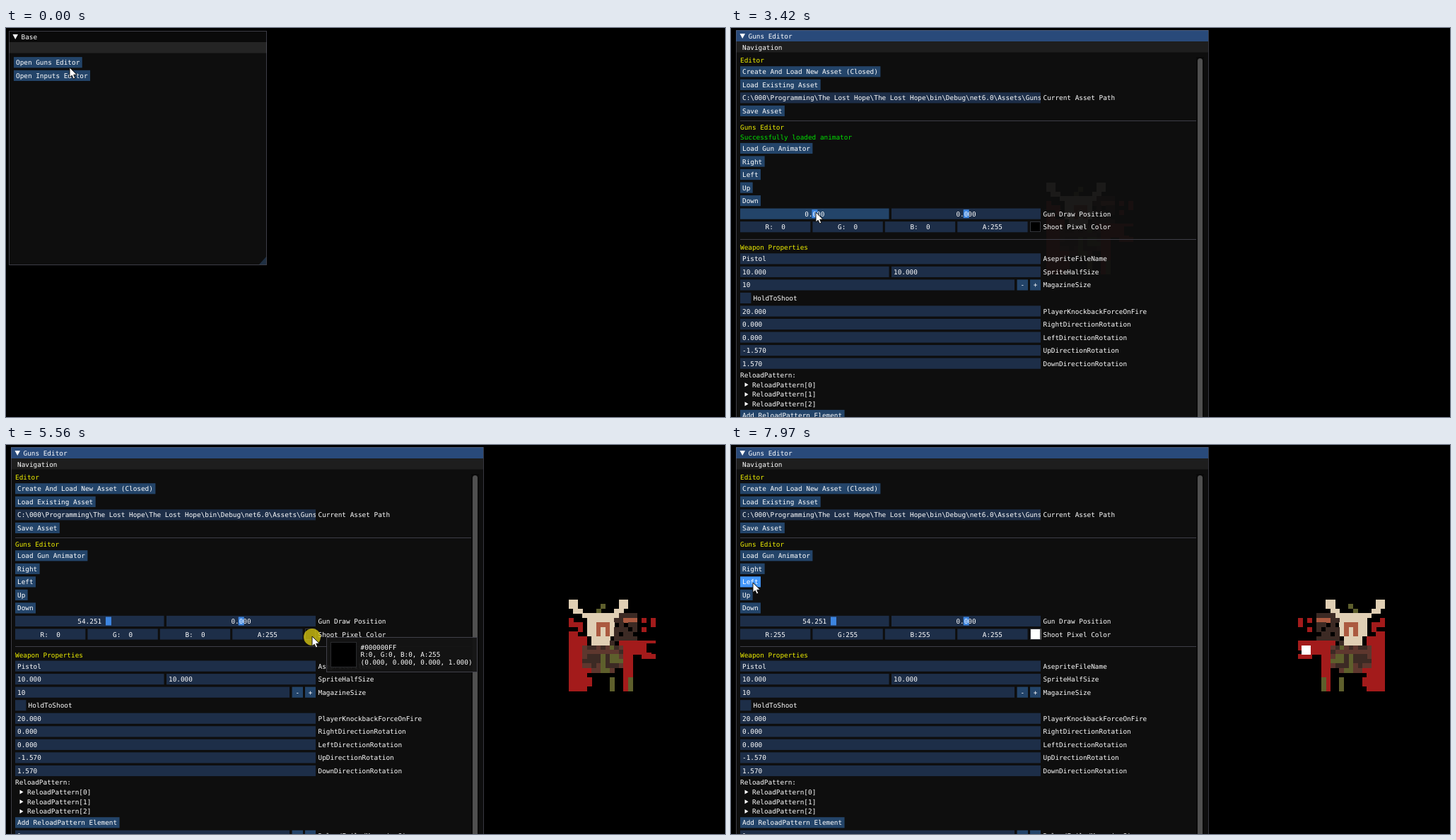
These frames come from a looping animation (1017x551 px, 8 s). An HTML page with a canvas:

```html
<!DOCTYPE html>
<html lang="en">
<head>
<meta charset="utf-8">
<title>Guns Editor</title>
<style>
html, body { margin: 0; width: 100%; height: 100%; overflow: hidden; background: #000; }
canvas { display: block; width: 1017px; height: 551px; }
</style>
</head>
<body>
<canvas id="stage" width="1017" height="551"></canvas>
<script>
const ctx = document.getElementById('stage').getContext('2d');
const LOOP = 8000, TICK = 67, CHAR = 5.647, CELL = 6.45;
const FRAME = '#1d2e48', BUTTON = '#234469', HOVER = '#4296fa', PRESS = '#0f87fa';
const FRAME_ACTIVE = '#3169ac', GRAB = '#3d85e0', GRAB_ACTIVE = '#5a9ee8';
const LINE = 'rgba(110,110,128,.5)', YELLOW = '#f0f000';
const clamp = (v, lo, hi) => Math.max(lo, Math.min(hi, v));

// Moments of the session, in ticks
const OPEN = 7, LOAD = 36, DRAG = 52, DROP = 68, TIP = 80, POPUP = 85, PICK = 90, PICKED = 93, CLOSE = 99, FLIP = 119;
const isDown = n => [[OPEN - 2, OPEN], [LOAD - 2, LOAD], [DRAG, DROP], [POPUP - 2, POPUP],
  [PICK, PICKED + 1], [CLOSE, CLOSE + 1], [FLIP - 2, FLIP]].some(([a, b]) => n >= a && n < b);

// The pointer glides to each stop: from tick, to tick, x, y
const SLIDE_X = 120, SLIDE = .489;
const slideTo = v => SLIDE_X + v * SLIDE;
const moves = [
  [0, 4, 98, 49], [13, 16, 56, 91], [16, 25, 69, 158], [39, 51, SLIDE_X, 262],
  [54, 58, slideTo(28.34), 262], [58, 59, slideTo(47.8), 262], [62, 63, slideTo(54.251), 262],
  [67, 76, 454, 291], [76, 79, 433, 272],
  [85, 89, 452, 345], [89, PICKED, 405, 265], [PICKED, 97, 351, 181], [100, 107, 32, 181], [107, 114, 31, 196]
];

function pointer(n) {
  let x = 90, y = 57;
  for (const [from, to, tx, ty] of moves) {
    const t = clamp((n - from) / (to - from), 0, 1), k = t * (2 - t);
    x += (tx - x) * k;
    y += (ty - y) * k;
  }
  return { x, y };
}
const gunX = n => (pointer(clamp(n, DRAG, DROP - 1)).x - SLIDE_X) / SLIDE;

function picked(n) {
  if (n < PICK) return { s: 0, v: 0 };
  const p = pointer(Math.min(n, PICKED));
  return { s: clamp((p.x - 429.5) / 165.5, 0, 1), v: 1 - clamp((p.y - 302) / 166, 0, 1) };
}
function rgbOf({ s, v }) {
  const lo = Math.round(255 * v * (1 - s));
  return [Math.round(255 * v), lo, lo];
}

// Drawing helpers
function rect(x0, y0, x1, y1, fill) {
  ctx.fillStyle = fill;
  ctx.fillRect(x0, y0, x1 - x0, y1 - y0);
}
function outline(x0, y0, x1, y1, color = LINE) {
  ctx.strokeStyle = color;
  ctx.lineWidth = 1;
  ctx.strokeRect(x0 + .5, y0 + .5, x1 - x0 - 1, y1 - y0 - 1);
}
function panel(x0, y0, x1, y1, fill, edge) {
  rect(x0, y0, x1, y1, fill);
  outline(x0, y0, x1, y1, edge);
}
function poly(fill, ...pts) {
  ctx.beginPath();
  pts.forEach(([x, y]) => ctx.lineTo(x, y));
  ctx.closePath();
  ctx.fillStyle = fill;
  ctx.fill();
}
function disc(x, y, r, fill) {
  ctx.beginPath();
  ctx.arc(x, y, r, 0, Math.PI * 2);
  ctx.fillStyle = fill;
  ctx.fill();
}
function text(s, x, c, color = '#fff', align = 'left') {
  ctx.fillStyle = color;
  ctx.textAlign = align;
  ctx.fillText(s, x, c + 3.5);
}
const bar = (x0, c, x1, fill = FRAME) => rect(x0, c - 7.6, x1, c + 7.6, fill);
function field(s, x0, c, x1, fill) {
  bar(x0, c, x1, fill);
  text(s, (x0 + x1) / 2, c, '#fff', 'center');
}

// Immediate-mode widgets, stacked from ui.y
const ui = { y: 0, mouse: null, down: false };

function over(x0, c, x1) {
  const m = ui.mouse;
  return m && m.x >= x0 && m.x <= x1 && Math.abs(m.y - c) <= 7.6;
}
function buttonAt(s, x, c) {
  const x1 = x + s.length * CHAR + 6.4;
  bar(x, c, x1, over(x, c, x1) ? (ui.down ? PRESS : HOVER) : BUTTON);
  text(s, x + 3, c);
}
function row() {
  const c = ui.y + 7.6;
  ui.y += 18.54;
  return c;
}
function line(s, color, x = 13) {
  const c = ui.y + 5.4;
  text(s, x, c, color);
  ui.y += 13.7;
  return c;
}
const button = s => buttonAt(s, 13, row());
const caption = (s, c) => text(s, 441.5, c);

function input(value, name) {
  const c = row();
  bar(13, c, 438);
  ctx.save();
  ctx.beginPath();
  ctx.rect(13, c - 8, 425, 16);
  ctx.clip();
  text(value, 16, c);
  ctx.restore();
  caption(name, c);
}
function pair(a, b, name) {
  const c = row();
  bar(13, c, 223.5);
  bar(227, c, 438);
  text(a, 16, c);
  text(b, 230, c);
  caption(name, c);
}
function stepper(value, name) {
  const c = row();
  bar(13, c, 401);
  text(value, 16, c);
  field('-', 404.6, c, 420, BUTTON);
  field('+', 423, c, 438, BUTTON);
  caption(name, c);
}
function checkbox(name) {
  const c = row();
  bar(13, c, 28.4);
  text(name, 31.5, c);
}
function slider(value, x0, c, x1, scale, active) {
  const mid = (x0 + x1) / 2, g = mid + .2 + value * scale;
  bar(x0, c, x1, active ? FRAME_ACTIVE : over(x0, c, x1) ? BUTTON : FRAME);
  rect(g - 4, c - 6, g + 4, c + 6, active ? GRAB_ACTIVE : GRAB);
  text(value.toFixed(3), mid, c, '#fff', 'center');
}
function sliders(a, b, scale, name, active) {
  const c = row();
  slider(a, 13, c, 223.5, scale, active);
  slider(b, 227, c, 438, scale, false);
  caption(name, c);
}
function separator(x1, before, after) {
  const y = Math.floor(ui.y + before);
  rect(13, y, x1, y + 1, '#3e3e47');
  ui.y += after;
}
// Channel boxes such as "R:255"
function channels(names, values, x, c, w, gap) {
  [...names].forEach((k, i) => {
    const x0 = x + i * (w + gap);
    field(k + ':' + String(values[i]).padStart(3), x0, c, x0 + w, over(x0, c, x0 + w) ? BUTTON : FRAME);
  });
}
function colorRow(rgb) {
  const c = row();
  channels('RGBA', [...rgb, 255], 13, c, 99.4, 3);
  bar(423, c, 438.4, `rgb(${rgb})`);
  outline(423, Math.round(c - 7.6), 438, Math.round(c + 7.6), '#34363c');
  caption('Shoot Pixel Color', c);
}

function titleBar(s, x0, y0, x1, bg, menu) {
  rect(x0, y0, x1, y0 + 16, bg);
  rect(x0, y0 + 16, x1, y0 + 31.5, menu);
  poly('#fff', [x0 + 5.5, y0 + 5], [x0 + 13, y0 + 5], [x0 + 9.2, y0 + 12]);
  text(s, x0 + 17.5, y0 + 8);
}

function baseWindow() {
  rect(4, 4, 369, 336, '#0e0e0e');
  titleBar('Base', 4, 4, 369, '#0a0a0a', '#242424');
  poly('#1f2f42', [358, 335], [368, 335], [368, 324]);
  outline(4, 4, 369, 336);
  buttonAt('Open Guns Editor', 11, 48.7);
  buttonAt('Open Inputs Editor', 11, 67.4);
}

function noise(x, y) {
  const v = Math.sin(x * 12.9898 + y * 78.233) * 43758.5453;
  return v - Math.floor(v);
}

// Colour of one cell of the creature on its 20 by 20 grid
function tint(x, y) {
  const red = '#a31b1b', cream = '#e0cfb4', rust = '#ab5a40', dark = '#3c2a24', brown = '#5e372e', olive = '#5e5f2c';
  const horn = Math.abs(x - 6), face = Math.abs(x - 6.5), eye = Math.abs(x - 7), r = noise(x, y);
  if (y < 3) {
    if (horn >= 5 - y / 1.5 && horn <= 6.5 - y / 2) return cream;
    return y > 0 && x + y === 8 ? olive : null;
  }
  if (y > 4 && y < 8 && eye <= 1 && (y === 5 || eye === 1)) return rust;
  if (y < 10 && face <= 3.6 - (y - 3) / 4) return cream;
  if (x > 9 && x < 15 && y < 9) return y === 4 && x > 11 ? rust : r < .85 ? dark : null;
  if (Math.hypot((x - 7) / 5, (y - 12) / 3.6) < 1) return r < .2 ? olive : r < .5 ? dark : brown;
  if ((x === 9 || x === 13) && y > 16) return olive;
  const cloak = y > 7 && x < 3 + 2 * r;
  const arm = x > 10 && x < 18 && y > 8 && y < 12;
  const leg = (x === 12 || x === 13) && y > 11;
  const shreds = y > 3 && y < 13 && (x > 14 ? r < .35 : x < 3 && r < .5);
  return cloak || arm || leg || shreds ? red : null;
}

function creature(x, y, flipped, rgb) {
  for (let i = 0; i < 400; i++) {
    const cx = i % 20, cy = Math.floor(i / 20), fill = tint(cx, cy);
    if (!fill) continue;
    const left = Math.round(x + (flipped ? 19 - cx : cx) * CELL), top = Math.round(y + cy * CELL);
    rect(left, top, left + 7, top + 7, fill);
  }
  const px = Math.round(x + (flipped ? 11 : 110)), py = y + (flipped ? 65 : 62);
  rect(px, py, px + 13, py + 13, `rgb(${rgb})`);
}

function gunsWindow(n, rgb) {
  const loaded = n >= LOAD, right = loaded ? 658 : 669;
  rect(7, 3, 675, 560, 'rgba(15,15,15,.94)');
  titleBar('Guns Editor', 7, 3, 675, '#294a7a', '#1e1e1e');
  text('Navigation', 16, 27);
  outline(7, 3, 676, 560);
  if (loaded) {
    rect(658, 41, 669, 551, 'rgba(5,5,5,.53)');
    ctx.beginPath();
    ctx.roundRect(660, 43, 7, 530, 3.5);
    ctx.fillStyle = '#4f4f4f';
    ctx.fill();
  }

  ui.y = 40.5;
  line('Editor', YELLOW);
  button('Create And Load New Asset (Closed)');
  button('Load Existing Asset');
  input(String.raw`C:\000\Programming\The Lost Hope\The Lost Hope\bin\Debug\net6.0\Assets\Guns`, 'Current Asset Path');
  button('Save Asset');
  separator(right, 3.6, 7.1);

  line('Guns Editor', YELLOW);
  if (loaded && n < DRAG) line('Successfully loaded animator', '#00e000');
  button('Load Gun Animator');
  if (loaded) {
    ['Right', 'Left', 'Up', 'Down'].forEach(button);
    sliders(gunX(n), 0, SLIDE, 'Gun Draw Position', n >= DRAG && n < DROP);
    colorRow(rgb);
  }
  separator(right, 6.7, 12.9);

  line('Weapon Properties', YELLOW);
  input('Pistol', 'AsepriteFileName');
  pair('10.000', '10.000', 'SpriteHalfSize');
  stepper('10', 'MagazineSize');
  checkbox('HoldToShoot');
  input('20.000', 'PlayerKnockbackForceOnFire');
  input('0.000', 'RightDirectionRotation');
  input('0.000', 'LeftDirectionRotation');
  input('-1.570', 'UpDirectionRotation');
  input('1.570', 'DownDirectionRotation');
  line('ReloadPattern:');
  for (let i = 0; i < 3; i++) {
    const m = line(`ReloadPattern[${i}]`, '#fff', 30);
    poly('#fff', [19.5, m - 3], [24.5, m], [19.5, m + 3]);
  }
  button('Add ReloadPattern Element');
  stepper('1', 'ReloadFailedMagazineSize');
  line('Bullet Properties', YELLOW);
  input('500.000', 'Speed');
  stepper('5', 'Damage');
  sliders(7.085, -.403, 1.8, 'RightFirePosition');
  sliders(-8.3, 0, 1.8, 'LeftFirePosition');
  sliders(1.417, -8.065, 1.8, 'UpFirePosition');
}

function tooltip() {
  panel(453, 272, 667, 322, 'rgba(20,20,20,.94)');
  panel(459, 279, 496, 315, '#000', '#2a2b2e');
  ['#000000FF', 'R:0, G:0, B:0, A:255', '(0.000, 0.000, 0.000, 1.000)']
    .forEach((s, i) => text(s, 501.5, 286 + i * 10.5));
}

function fade(x0, x1, across, colors) {
  const top = 302, bottom = 468;
  const g = ctx.createLinearGradient(x0, top, across ? x1 : x0, across ? top : bottom);
  colors.forEach((c, i) => g.addColorStop(i / (colors.length - 1), c));
  rect(x0, top, x1, bottom, g);
}

function picker(hsv, rgb) {
  const color = `rgb(${rgb})`, bytes = [...rgb, 255];
  const hex = '#' + bytes.map(v => v.toString(16).padStart(2, '0')).join('').toUpperCase();
  panel(423, 279, 670, 531, 'rgba(20,20,20,.96)');
  text('Shoot Pixel Color', 430, 291);

  fade(429.5, 595, true, ['#fff', '#f00']);
  fade(429.5, 595, false, ['rgba(0,0,0,0)', '#000']);
  fade(598, 613.5, false, ['#f00', '#ff0', '#0f0', '#0ff', '#00f', '#f0f', '#f00']);
  poly('#fff', [597, 300], [601, 302.5], [597, 305]);
  poly('#fff', [615, 300], [611, 302.5], [615, 305]);
  const hx = clamp(429.5 + hsv.s * 165.5, 432, 593), hy = clamp(302 + (1 - hsv.v) * 166, 304, 466);
  disc(hx, hy, 5.5, '#777');
  disc(hx, hy, 5, '#fff');
  disc(hx, hy, 4, color);

  text('Current', 617, 308);
  panel(617, 317, 663, 347, color, '#55565f');
  text('Original', 617, 355.5);
  panel(617, 364, 663, 395, '#000', '#55565f');

  channels('RGBA', bytes, 429.5, 479, 43.6, 3.1);
  channels('HSVA', [0, Math.round(hsv.s * 255), Math.round(hsv.v * 255), 255], 429.5, 497.5, 43.6, 3.1);
  bar(429.5, 516, 613.5);
  text(hex, 432.5, 516);
}

function mouse(n) {
  const { x, y } = pointer(n);
  if (isDown(n)) disc(x, y, 12, 'rgba(225,208,20,.75)');
  ctx.save();
  ctx.translate(x, y - 1);
  ctx.lineWidth = 1;
  ctx.strokeStyle = '#111';
  poly('#fff', [0, 0], [0, 14], [3.2, 11.2], [5.4, 16], [7.8, 15], [5.7, 10.3], [10.2, 10]);
  ctx.stroke();
  ctx.restore();
}

function draw(n) {
  const popup = n >= POPUP && n < CLOSE, dragging = n >= DRAG && n < DROP;
  const hsv = picked(n), rgb = rgbOf(hsv);
  ctx.font = '9.38px "DejaVu Sans Mono", monospace';
  ctx.textRendering = 'geometricPrecision';
  rect(0, 0, 1017, 551, '#000');
  // Widgets react one tick behind the pointer
  ui.mouse = popup || dragging ? null : pointer(Math.max(0, n - 1));
  ui.down = isDown(n);
  if (n < OPEN) baseWindow();
  else {
    if (n >= LOAD) creature(446 + gunX(n - 1) * CELL, 219, n >= FLIP, rgb);
    gunsWindow(n, rgb);
    if (n >= TIP && n < POPUP) tooltip();
    if (popup) picker(hsv, rgb);
  }
  mouse(n);
}

function loop() {
  draw(Math.floor((performance.now() % LOOP + 15) / TICK));
  requestAnimationFrame(loop);
}
loop();
</script>
</body>
</html>
```
